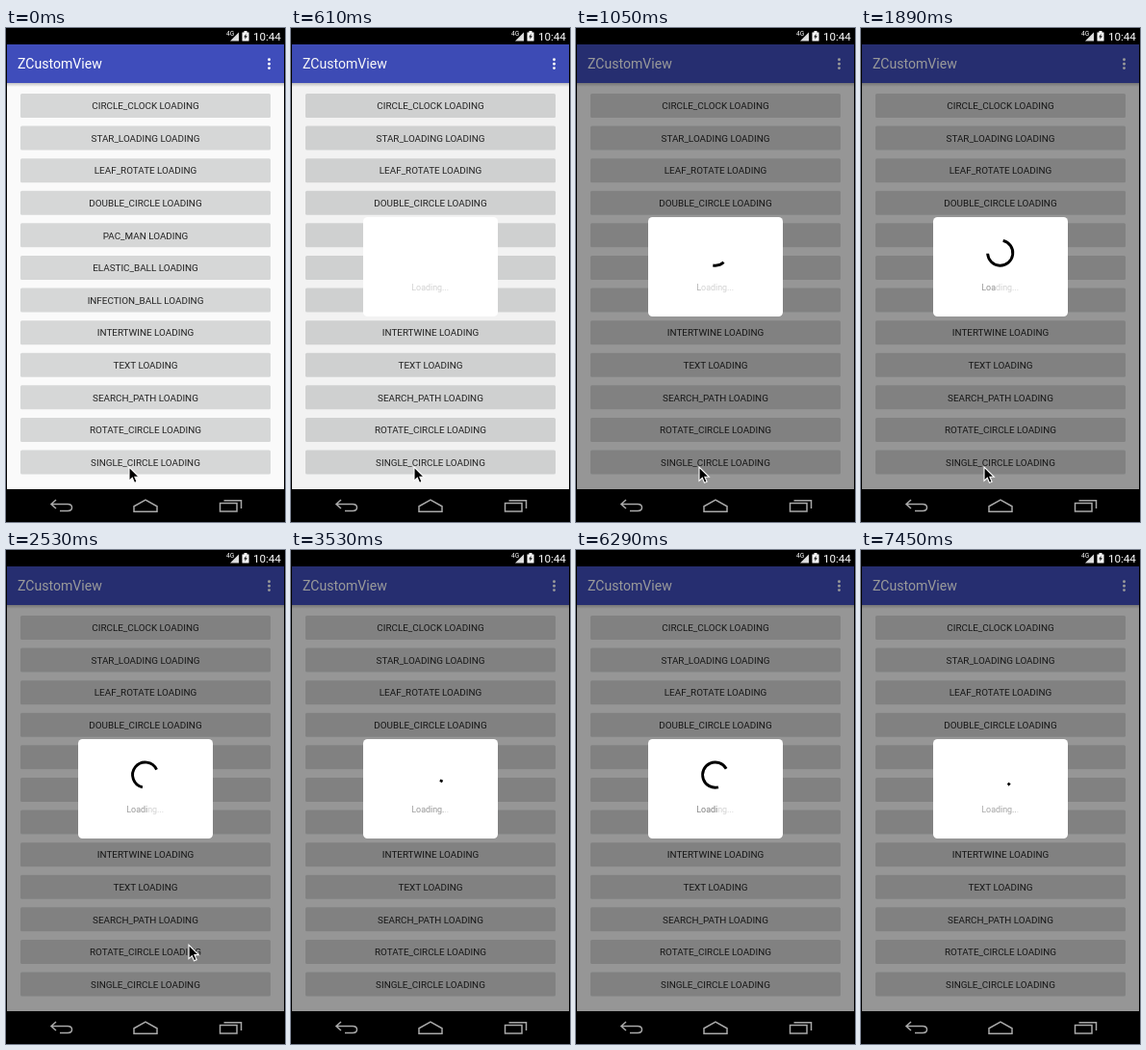
An HTML page for the animation above (7.49 s loop, 290 px wide and 512 px high).

```html
<!DOCTYPE html>
<html lang="en">
<head>
<meta charset="utf-8">
<title>Loading dialog</title>
<style>
  html, body { margin: 0; width: 100%; height: 100%; overflow: hidden; background: #000; }
  svg { display: block; width: 290px; height: 512px; font-family: Roboto, "Noto Sans", sans-serif; }
</style>
</head>
<body>
<svg viewBox="0 0 290 512">
  <defs>
    <linearGradient id="shade" x2="0" y2="1">
      <stop stop-color="#000" stop-opacity=".22"/>
      <stop offset="1" stop-color="#000" stop-opacity="0"/>
    </linearGradient>
  </defs>
  <rect width="290" height="512"/>

  <g fill="#fff">
    <text x="257" y="13.2" font-size="11.6" textLength="">10:44</text>
    <text x="229" y="7.8" font-size="6.5">4G</text>
    <path d="M233 13.5L242 4.500V13.500Z" fill="#ddd"/>
    <path d="M245.500 4.500H247.500V3H250.500V4.500H252.500V13.500H245.500Z"/>
    <path d="M249.800 5.500L247 9.500H248.800L248 12.300L251 8.300H249.200Z" fill="#222"/>
  </g>

  <rect x="1" y="17" width="288" height="461" fill="#fafafa"/>
  <rect x="1" y="17" width="288" height="40" fill="#3f4dbb"/>
  <rect x="1" y="57" width="288" height="4" fill="url(#shade)"/>
  <text x="12" y="42.300" font-size="14.100" fill="#fff">ZCustomView</text>
  <g fill="#fff">
    <circle cx="273.500" cy="32.800" r="1.450"/>
    <circle cx="273.500" cy="37.200" r="1.450"/>
    <circle cx="273.500" cy="41.600" r="1.450"/>
  </g>
  <g id="buttons" font-size="9.880" text-anchor="middle"></g>

  <rect id="dim" x="1" y="17" width="288" height="461"/>

  <g id="dialog">
    <rect x="75" y="196" width="140" height="103" rx="4.500" fill="#fff"/>
    <path id="arc" fill="none" stroke="#000" stroke-width="2.900"/>
    <g font-size="8.900" fill="#888" text-anchor="middle">
      <text x="144.700" y="272.300" fill-opacity=".39">Loading...</text>
      <text x="144.700" y="272.300"><tspan id="lit"></tspan><tspan id="unlit" fill-opacity="0"></tspan></text>
    </g>
  </g>

  <g fill="none" stroke="#a8a8a8" stroke-width="1.500">
    <path d="M52 489L47 493.500L52 498M47.500 493.500H64C70 493.500 70 500.500 64 500.500H56"/>
    <path d="M133 501.300V495.800L145 489.200L157 495.800V501.300Z"/>
    <path d="M222.500 492.500H240V501H222.500ZM226.500 489.700H244.500V498"/>
  </g>

  <path id="cursor" d="M0 0V14.300L3.300 11.300L5.500 16.400L8.100 15.300L5.900 10.300H10.300Z" stroke="#fff" stroke-width="1.100"/>
</svg>
<script>
const LOOP = 7490, FRAME = 40, FRAME_OFFSET = 10;
const DIALOG_AT = 570, DIM_AT = 585, DIM_MS = 320;
const SPIN = { start: 880, turn: 1285, min: 12, max: 320, x: 144.7, y: 233.1, r: 13.1 };
const HINT = { text: "Loading...", start: 657, step: 333 };
const POINTER = { x: 128, y: 455, start: 2357, gone: 2810, vx: 0.3585, vy: -0.264 };
const LABELS = ["CIRCLE_CLOCK", "STAR_LOADING", "LEAF_ROTATE", "DOUBLE_CIRCLE", "PAC_MAN",
  "ELASTIC_BALL", "INFECTION_BALL", "INTERTWINE", "TEXT", "SEARCH_PATH", "ROTATE_CIRCLE", "SINGLE_CIRCLE"];

const $ = id => document.getElementById(id);
const clamp01 = v => Math.min(1, Math.max(0, v));
const show = (el, on) => el.setAttribute("visibility", on ? "visible" : "hidden");

$("buttons").innerHTML = LABELS.map((label, i) => {
  const y = 80.5 + i * 33.59;
  return `<rect x="15" y="${y - 12.5}" width="260" height="25" rx="1.5" fill="#d6d7d7"/>
    <text x="145" y="${y + 3.7}" fill="#222">${label} LOADING</text>`;
}).join("");

function pointOnRing(deg) {
  const a = deg * Math.PI / 180;
  return `${(SPIN.x + SPIN.r * Math.cos(a)).toFixed(2)} ${(SPIN.y + SPIN.r * Math.sin(a)).toFixed(2)}`;
}

// Each turn the arc grows, shrinks, or stays a short dash.
function drawSpinner(t) {
  show($("arc"), t >= SPIN.start);
  if (t < SPIN.start) return;
  const turns = (t - SPIN.start) / SPIN.turn;
  const v = turns % 1, span = SPIN.max - SPIN.min;
  const sweep = [SPIN.min + span * v, SPIN.max - span * v, SPIN.min][Math.floor(turns) % 3];
  const tail = 360 * v;
  $("arc").setAttribute("d",
    `M${pointOnRing(tail)}A${SPIN.r} ${SPIN.r} 0 ${sweep > 180 ? 1 : 0} 1 ${pointOnRing(tail + sweep)}`);
}

function drawHint(t) {
  const steps = Math.max(0, (t - HINT.start) / HINT.step);
  const count = Math.floor(steps) % (HINT.text.length + 1);
  $("lit").textContent = HINT.text.slice(0, count);
  $("unlit").textContent = HINT.text.slice(count);
  $("lit").setAttribute("fill-opacity", (100 + 155 * (steps % 1) ** 2) / 255);
}

function drawPointer(t) {
  const moved = Math.max(0, t - POINTER.start);
  show($("cursor"), t < POINTER.gone);
  $("cursor").setAttribute("transform",
    `translate(${POINTER.x + POINTER.vx * moved} ${POINTER.y + POINTER.vy * moved})`);
}

function render(time) {
  const t = Math.floor((time - FRAME_OFFSET) / FRAME) * FRAME + FRAME_OFFSET;
  const fade = clamp01((t - DIM_AT) / DIM_MS);
  $("dim").setAttribute("opacity", 0.4 * fade);
  show($("dialog"), t >= DIALOG_AT);
  if (t >= DIALOG_AT) drawSpinner(t);
  else show($("arc"), false);
  drawHint(t);
  drawPointer(t);
}

const began = performance.now();
function tick() {
  render((performance.now() - began) % LOOP);
  requestAnimationFrame(tick);
}
tick();
</script>
</body>
</html>
```
